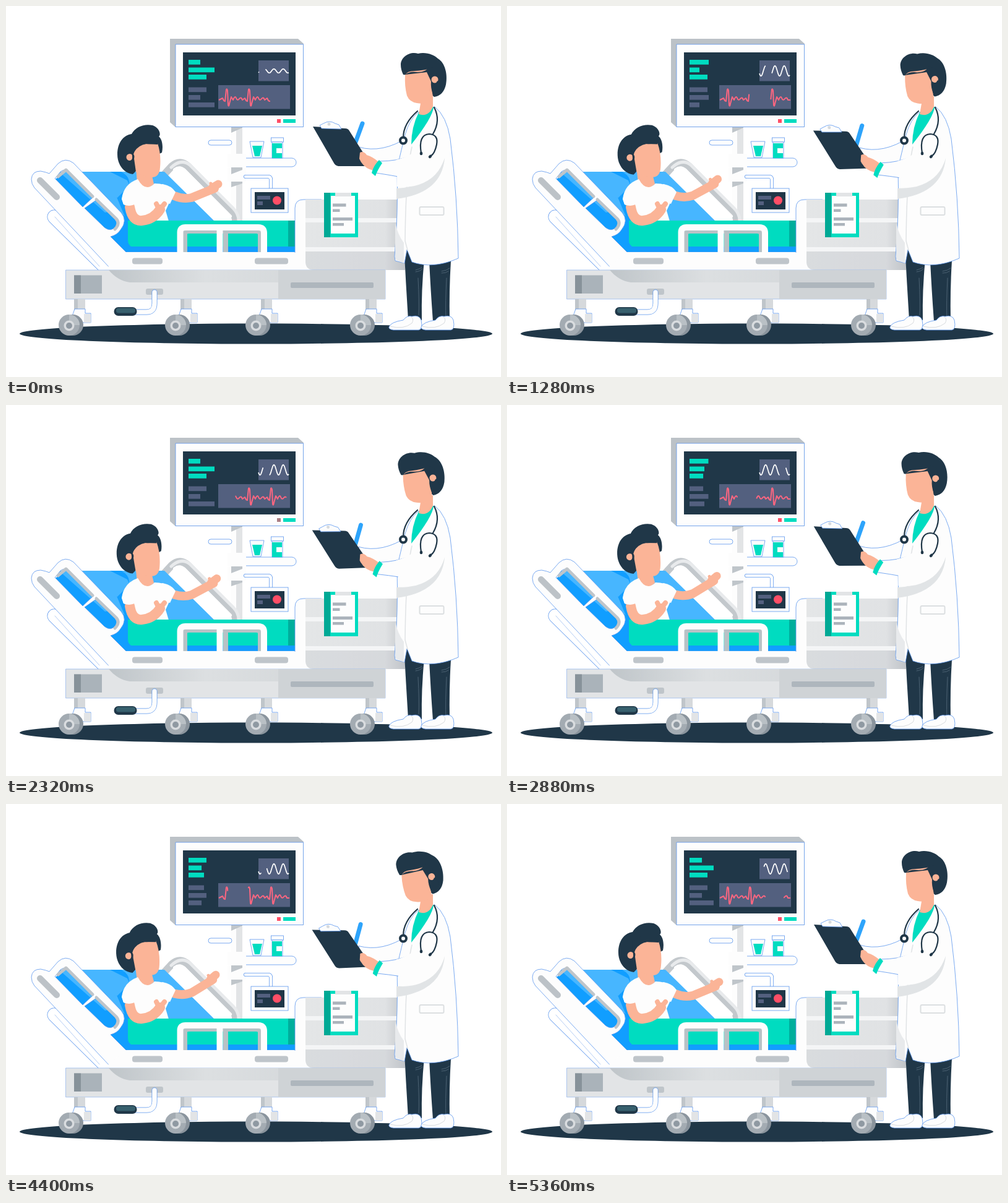
An HTML page that plays this animation: 800x600 px, repeating every 5.44 s.

```html
<!DOCTYPE html>
<html lang="en">
<head>
<meta charset="utf-8">
<title>Hospital visit</title>
<style>
html, body { margin: 0; width: 100%; height: 100%; overflow: hidden; background: #fff; }
svg { display: block; width: 100vw; height: 100vh; }
.white { fill: #fdfdfd; }
.edge { fill: #fdfdfd; stroke: #5b96ee; stroke-width: .8; }
.dark { fill: #203748; }
.skin { fill: #fbb497; }
.green { fill: #00dcc0; }
.slate { fill: #53607f; }
.blue { fill: #119eff; }
.sky { fill: #47b6ff; }
.mid { fill: #bfc5ca; }
.pale { fill: #e2e4e6; }
.line { fill: none; stroke-linecap: round; stroke-linejoin: round; }
</style>
</head>
<body>
<svg viewBox="0 0 800 600" xmlns="http://www.w3.org/2000/svg">
<defs>
  <linearGradient id="foot">
    <stop offset="0" stop-color="#e4e6e7"/><stop offset=".8" stop-color="#e0e2e4"/><stop offset="1" stop-color="#c3c7ca"/>
  </linearGradient>
  <linearGradient id="band">
    <stop offset="0" stop-color="#bfc5c9"/><stop offset=".35" stop-color="#dcdfe1"/><stop offset="1" stop-color="#cfd3d6"/>
  </linearGradient>
  <g id="wheel">
    <rect class="mid" x="110" y="474" width="18" height="20"/>
    <rect x="116" y="474" width="12" height="20" fill="#d6d9dc"/>
    <path class="edge" d="M111 490h17v7h9v15H106v-8z"/>
    <path class="pale" d="M126 498h11v14h-11z"/>
    <circle cx="108" cy="516" r="17" fill="#8a949d"/>
    <circle cx="102" cy="516" r="17" fill="#a3abb2"/>
    <path d="M102 499a17 17 0 0 1 17 17h-17z" fill="#b9c0c5"/>
    <circle cx="102" cy="517" r="8.5" fill="#d9dcdf"/>
    <circle cx="102" cy="517" r="5" fill="#8f99a2"/>
  </g>
  <g id="shoe">
    <path class="edge" d="M619 519Q622 511 642 508Q648 500 656 502Q668 499 671 508Q674 523 667 524L626 524Q618 523 619 519Z"/>
    <path d="M621 518Q642 524 656 513Q660 506 655 503" class="line" stroke="#d9dcdf"/>
  </g>
</defs>

<ellipse class="dark" cx="404" cy="530" rx="382" ry="16.5"/>

<!-- stand and shelf -->
<rect class="pale" x="364" y="195" width="18" height="153"/>
<rect class="white" x="364" y="195" width="8" height="153"/>
<path class="mid" d="M364 195h18v2l-18 8z"/>
<rect class="edge" x="327" y="217" width="38" height="8" rx="4"/>
<rect class="edge" x="380" y="246" width="89" height="14" rx="7"/>
<rect class="white" x="358" y="239" width="30" height="22"/>
<rect class="white" x="358" y="262" width="30" height="22"/>
<path class="mid" d="M364 261h18v4l-18 7zM364 284h18v3l-18 6z"/>
<path class="line" d="M387 276H424Q428 276 428 281V296" stroke="#5b96ee" stroke-width="6"/>
<path class="line" d="M387 276H424Q428 276 428 281V296" stroke="#fff" stroke-width="4.5"/>
<rect class="edge" x="396" y="295" width="60" height="39"/>
<rect class="dark" x="402" y="301" width="48" height="28"/>
<path class="slate" d="M406 307h21v6h-21zM406 316h9v6h-9z"/>
<circle cx="438" cy="314.500" r="7" fill="#ff4e66"/>
<path class="edge" d="M394 219h23l-5 26h-13z"/>
<path class="green" d="M398 226h16l-4 17h-8z"/>
<rect class="edge" x="428.500" y="213" width="20" height="7"/>
<path class="edge" d="M430 220h17v26h-17z"/>
<path class="green" d="M430 222h16v8h-9v8h9v8h-16z"/>

<!-- monitor -->
<path d="M265 53H472L481 61V196H274L265 188Z" fill="#bcc2c7"/>
<path class="edge" d="M274 62H480.500V195.500H274Z"/>
<path class="dark" d="M286 75h182v102H286z"/>
<path class="slate" d="M408 88h49v33.500h-49zM343 128h116v38.500H343z"/>
<g id="bars"></g>
<path id="wave" class="line" pathLength="49" stroke="#fff" stroke-width="1.700" stroke-dasharray="39 10" style="stroke-linecap:butt"/>
<path id="pulse" class="line" pathLength="1" stroke="#ff6680" stroke-width="2" stroke-dasharray=".7 .3" style="stroke-linecap:butt"/>
<rect id="led" x="438" y="183" width="6" height="6"/>
<rect class="green" x="448" y="183" width="20" height="6"/>

<!-- far rail and mattress -->
<path class="line" d="M256 272L268 259Q281 248 294 259L362 328Q371 338 371 347" stroke="#c3c8cc" stroke-width="12"/>
<path class="line" d="M267 261Q283 246 297 257L367 327Q376 336 376 347" stroke="#e8eaec" stroke-width="5"/>
<path class="line" d="M273 265Q281 259 289 267L362 340" stroke="#fff" stroke-width="6"/>
<path class="sky" d="M76 268H256L336 347H215L196 398Z"/>
<path class="blue" d="M168 268H186Q205 278 196 296L240 347H205V398H190L80 280L90 272L160 334Q180 330 192 340L175 300Q205 298 196 282Z"/>
<path class="sky" d="M108 270H168Q196 281 200 290Q190 300 180 310L152 307Z"/>

<!-- patient -->
<g id="patientHead">
  <path class="skin" d="M210 262L212 286Q225 302 239 288L235 270Z"/>
  <path class="dark" d="M205 272C189 270 180 255 180 240C180 222 189 209 203 207C209 195 224 190 237 193C248 197 251 208 247 211C253 216 254 228 252 237L246 240L214 250L211 266Z"/>
  <path class="skin" d="M206 240Q210 225 225 223Q238 224 245 222Q251 240 249 261Q248 276 237 277Q222 277 210 268Z"/>
  <path class="dark" d="M207 236Q214 225 227 223L245 224L247 214L218 213L203 222V238Z"/>
  <circle class="skin" cx="200" cy="244.500" r="5.500"/>
  <path class="dark" d="M203 238q7 2 3 12q3 10 0 18q-8 0-9-8l4-10q5-2 2-12z"/>
</g>
<path class="white" d="M187 312Q190 288 213 280Q225 302 240 287Q262 287 274 301L264 318L258 331L263 348H214Q210 326 190 321Z"/>
<g id="patientArm" class="line" stroke="#fbb497">
  <path d="M272 307Q286 313 300 310L337 295" stroke-width="14"/>
  <path d="M333 294L343 288" stroke-width="13"/>
  <path d="M332 292L331 287" stroke-width="5"/>
</g>
<path class="white" d="M252 288Q267 290 274 301L265 320L250 315Z"/>
<path class="green" d="M197 347H466V390H205Q197 388 197 378Z"/>
<path d="M456 347h11v43h-11z" fill="#00ae9c"/>
<path class="blue" d="M188 389H467V399H188Z"/>
<path class="line" d="M200 325Q204 349 220 347Q239 345 249 329" stroke="#fbb497" stroke-width="16"/>
<path class="line" d="M249 329L256 320M247 328L243 320" stroke="#fbb497" stroke-width="8"/>
<path class="white" d="M187 312Q192 296 203 296L212 318Q202 326 190 321Z"/>

<!-- near rails -->
<path class="line" d="M78 341L164 426" stroke="#5b96ee" stroke-width="23"/>
<path class="line" d="M78 341L164 426" stroke="#fff" stroke-width="21.500"/>
<path class="line" d="M79 341L151 421" stroke="#b4cdf4" stroke-width="1"/>
<path class="edge" fill-rule="evenodd" d="M41 280Q42 267 56 267Q66 269 70 271L84 255Q96 244 109 254L186 334Q197 347 185 362Q180 370 169 373L194 398L484 398V426H170L46 294Q41 288 41 280Z
 M79 279L124 325L141 309L97 266Q92 264 88 268Z M127 327L159 358Q169 366 177 357Q184 349 177 342L147 313Z"/>
<path class="line" d="M84 276L97 265L140 308M146 313L178 344Q185 352 176 361" stroke="#bfc5ca" stroke-width="5"/>
<path class="line" d="M55 282L82 309" stroke="#bcc2c7" stroke-width="10"/>
<path d="M160 426L194 398H487V427H160Z" class="white"/>
<rect class="mid" x="204" y="407.500" width="49" height="10" rx="4"/>
<rect class="mid" x="402" y="407.500" width="54" height="10" rx="4"/>
<g class="line" stroke-width="8" style="stroke-linecap:butt">
  <path d="M289 398V369Q289 364 296 364H404Q411 364 411 370V398M355 364V398" stroke="#b8c2c6"/>
  <path d="M281.500 398V366Q281.500 358 290 358H408Q417 358 417 367V398M345.500 358V398" stroke="#fdfdfd" stroke-width="10"/>
</g>

<!-- footboard -->
<path class="edge" d="M467 398V327Q467 313 481 313H510V427H467Z"/>
<path class="white" d="M460 399H500V427H460Z"/>
<path d="M484 313H645V427H498Q484 427 484 413Z" fill="url(#foot)"/>
<path d="M484 343H645V350H484zM484 390H645V397H484z" fill="#f4f5f6"/>
<path d="M484 397H645V427H498Q484 427 484 413Z" fill="#b8bdc1" opacity=".25"/>
<path class="green" d="M514 302h55v72h-55z"/>
<path d="M514 302h10v72h-10z" fill="#00a995"/>
<path class="white" d="M525 307h39v61h-39z"/>
<path class="pale" d="M532 302h26v6h-26z"/>
<path fill="#abb3bb" d="M528 319.500h21.500v5H528zM528 328.500h11.500v4.500H528zM528 342h32v5H528zM528 351h18v4.500H528z"/>

<!-- base -->
<path class="pale" d="M96.500 427H613V474H96.500Z" stroke="#8fb4ec" stroke-width=".7"/>
<path d="M166 427H613V447H200Q180 444 166 427Z" fill="url(#band)"/>
<path d="M440 427H613V474H440Z" fill="#cfd3d6"/>
<rect x="460" y="447" width="134" height="9" rx="2" fill="#aeb6bd"/>
<path d="M110 435.500h45V465h-45z" fill="#aab3ba"/>
<path d="M110 435.500h11V465h-11z" fill="#87929a"/>
<rect class="mid" x="226" y="457" width="28" height="10" rx="3"/>
<path class="line" d="M240 463V481Q240 495 227 495H208" stroke="#5b96ee" stroke-width="9"/>
<path class="line" d="M240 463V481Q240 495 227 495H208" stroke="#fdfdfd" stroke-width="7.500"/>
<rect class="dark" x="174.500" y="487" width="37" height="14" rx="7"/>
<rect x="178" y="488.500" width="31" height="8" rx="4" fill="#37606e"/>
<use href="#wheel"/><use href="#wheel" x="172"/><use href="#wheel" x="302"/><use href="#wheel" x="471"/>

<!-- doctor -->
<path class="dark" d="M643 384L676 410Q671 460 672 508H650Q646 445 643 384ZM684 412H719Q716 460 717 510H690Q686 455 684 412Z"/>
<path class="line" d="M662 430q8-1 11-5M662 427q7-2 10-4M704 429q8-1 13-5M704 432q7 0 11-3M666 440Q668 480 667 500M712 440Q710 480 711 506" stroke="#4c6273"/>
<use href="#shoe"/><use href="#shoe" x="52"/>
<g id="backArm">
  <path class="edge" d="M570 228Q608 239 650 212L642 252L610 263L575 250Z"/>
</g>
<path class="edge" d="M666 172Q652 183 645 208L632 262Q634 335 628 405L629 412L644 416L648 394L656 414Q690 426 731 408Q730 310 718 215Q712 178 693 163Z"/>
<path d="M629 350Q633 370 643 383V416L629 410Z" fill="#e8eaec"/>
<path class="line" d="M656 228Q646 270 645 380L649 395" stroke="#e0e3e5" stroke-width="1.500"/>
<rect class="line" x="668.500" y="325" width="39" height="13" rx="2" stroke="#dcdfe1" stroke-width="2"/>
<path class="green" d="M667 172L691 163Q690 180 655 224Q655 196 667 172Z"/>
<path class="skin" d="M672 146H690V163Q683 180 667 175Z"/>
<path d="M631 295Q690 292 709 246Q704 303 631 312Z" fill="#e1e4e6"/>
<g id="arm">
  <path id="pen" class="line" d="M576 190L565 220" stroke="#2ea4fb" stroke-width="7"/>
  <path class="dark" d="M496 195L548 198Q553 198 555 202L589 256Q589 259 584 259H537Q532 258 530 254Z"/>
  <path class="edge" d="M507 193L513 190Q523 184 532 190L538 192L542 199L510 198Z"/>
  <circle cx="522" cy="191" r="2.500" fill="#d6dade"/>
  <path class="edge" d="M605 251Q630 251 652 243L662 285L634 276Q618 273 598 270Z"/>
  <path class="white" d="M630 249Q655 244 690 215L708 248Q697 282 660 291Q642 294 632 292V275Z"/>
  <path class="skin" d="M572 237Q578 234 583 241Q593 244 602 252L594 266Q578 263 571 247Z"/>
  <path class="green" d="M603 249L608 254Q600 266 597 275L591 270Q594 258 603 249Z"/>
</g>
<g class="line" stroke="#203748" stroke-width="2.200">
  <path d="M665 170Q642 190 642 213M692 164Q703 185 690 207M671 238Q666 208 684 207Q699 208 696 224Q693 239 686 243"/>
  <circle cx="642" cy="217.500" r="5" fill="#fff" stroke-width="4"/>
  <path d="M671 238v1M686 243l-1 1" stroke-width="4.500"/>
</g>
<g id="doctorHead">
  <path class="dark" d="M642 111Q638 103 638 95C638 82 653 73 666 77C679 74 692 79 698 85C710 92 714 111 711 127Q707 145 692 147L686 142L684 115Z"/>
  <path class="skin" d="M645 112Q648 105 660 105Q675 104 682 102L688 112L690 152Q678 160 664 157Q652 155 648 145Q644 130 645 112Z"/>
  <path class="dark" d="M645 111Q652 105 665 107Q680 107 684 97L697 104L694 118L690 143Q686 132 687 122L680 107Z"/>
  <circle class="skin" cx="693" cy="119" r="5.500"/>
  <path class="dark" d="M697 121Q704 126 704 138Q698 147 691 146Q687 136 690 124Q694 128 697 121Z"/>
</g>
</svg>
<script>
const LOOP = 5440, STEP = 80;
const el = id => document.getElementById(id);
const set = (node, name, value) => node.setAttribute(name, value);

// Value of a cyclic [phase, value] track.
function track(keys, phase) {
  const i = keys.findIndex(k => k[0] > phase);
  const [p0, v0] = keys[i - 1], [p1, v1] = keys[i];
  const u = (phase - p0) / (p1 - p0);
  return v0 + (v1 - v0) * u;
}

const NOD = [[0, 0], [.08, .08], [.26, .6], [.32, 1], [.47, .3], [.62, 1], [.85, .6], [.97, 0], [1, 0]];
const WRITE = [[0, 0], [.08, .1], [.26, .75], [.32, 1], [.47, .38], [.62, .5], [.85, .45], [.97, 0], [1, 0]];
const LED = [[0, 0], [.18, 0], [.22, 1], [.28, 1], [.32, .35], [.38, 0], [.78, 0], [.85, .35], [.92, 0], [1, 0]];
const BAR_PHASES = [0, .28, .427, .485, .706, .897, .956, 1];
const BAR_WIDTHS = [
  [19, 19, 29, 30, 31, 35, 20, 19],
  [42, 42, 21, 31, 16, 13, 39, 42],
  [29, 29, 25, 16, 29, 30, 29, 29]
].map(row => row.map((w, i) => [BAR_PHASES[i], w]));

const bars = [87, 99.5, 111, 131.5, 144, 156].map((y, i) => {
  const bar = document.createElementNS('http://www.w3.org/2000/svg', 'rect');
  set(bar, 'class', i < 3 ? 'green' : 'slate');
  set(bar, 'x', 295);
  set(bar, 'y', y);
  set(bar, 'height', 7.7);
  el('bars').append(bar);
  return bar;
});

const beat = p => `L${p - 7} 149L${p - 5} 153L${p - 3} 154L${p - 1} 135Q${p} 133 ${p + 1} 137L${p + 2} 160` +
  `Q${p + 3} 164 ${p + 4} 158L${p + 7} 147L${p + 10} 152Q${p + 13} 144 ${p + 15} 149T${p + 20} 150T${p + 25} 152`;
set(el('pulse'), 'd', 'M344 152' + [357, 393, 429].map(beat).join('') + 'L458 152');

function sine(amp) {
  let d = '';
  for (let x = 408; x <= 457; x++) {
    d += (d ? 'L' : 'M') + x + ' ' + (105 - amp * Math.cos((x - 418) / 15 * 2 * Math.PI)).toFixed(2);
  }
  return d;
}

const rotate = (id, angle, x, y) => set(el(id), 'transform', `rotate(${angle} ${x} ${y})`);

function draw(t) {
  const slow = t / LOOP * 2 % 1, fast = t / LOOP * 3 % 1;

  const sway = (1 - Math.cos(fast * 2 * Math.PI)) / 2;
  rotate('patientHead', -2.6 * sway, 228, 285);
  rotate('patientArm', -10 * sway, 270, 306);

  const write = track(WRITE, slow);
  rotate('doctorHead', -6.3 * track(NOD, slow), 676, 166);
  rotate('arm', -5 * write, 690, 232);
  rotate('backArm', -1.5 * write, 690, 232);
  rotate('pen', -5 * write, 567, 217);

  const widths = BAR_WIDTHS.map(keys => track(keys, fast));
  bars.forEach((bar, i) => set(bar, 'width', widths[i < 3 ? i : (i + 2) % 3]));
  set(el('pulse'), 'stroke-dashoffset', -fast);
  set(el('wave'), 'd', sine(t < 1088 ? 3.3 : 8.3));
  set(el('wave'), 'stroke-dashoffset', -(11 + t / LOOP * 5 * 49) % 49);

  const glow = track(LED, slow);
  const mix = (a, b) => Math.round(a + (b - a) * glow);
  set(el('led'), 'fill', `rgb(${mix(255, 0)},${mix(78, 220)},${mix(102, 192)})`);
}

const start = performance.now();
function tick() {
  const t = (performance.now() - start) % LOOP;
  draw(Math.floor(t / STEP) * STEP);
  requestAnimationFrame(tick);
}
tick();
</script>
</body>
</html>
```
